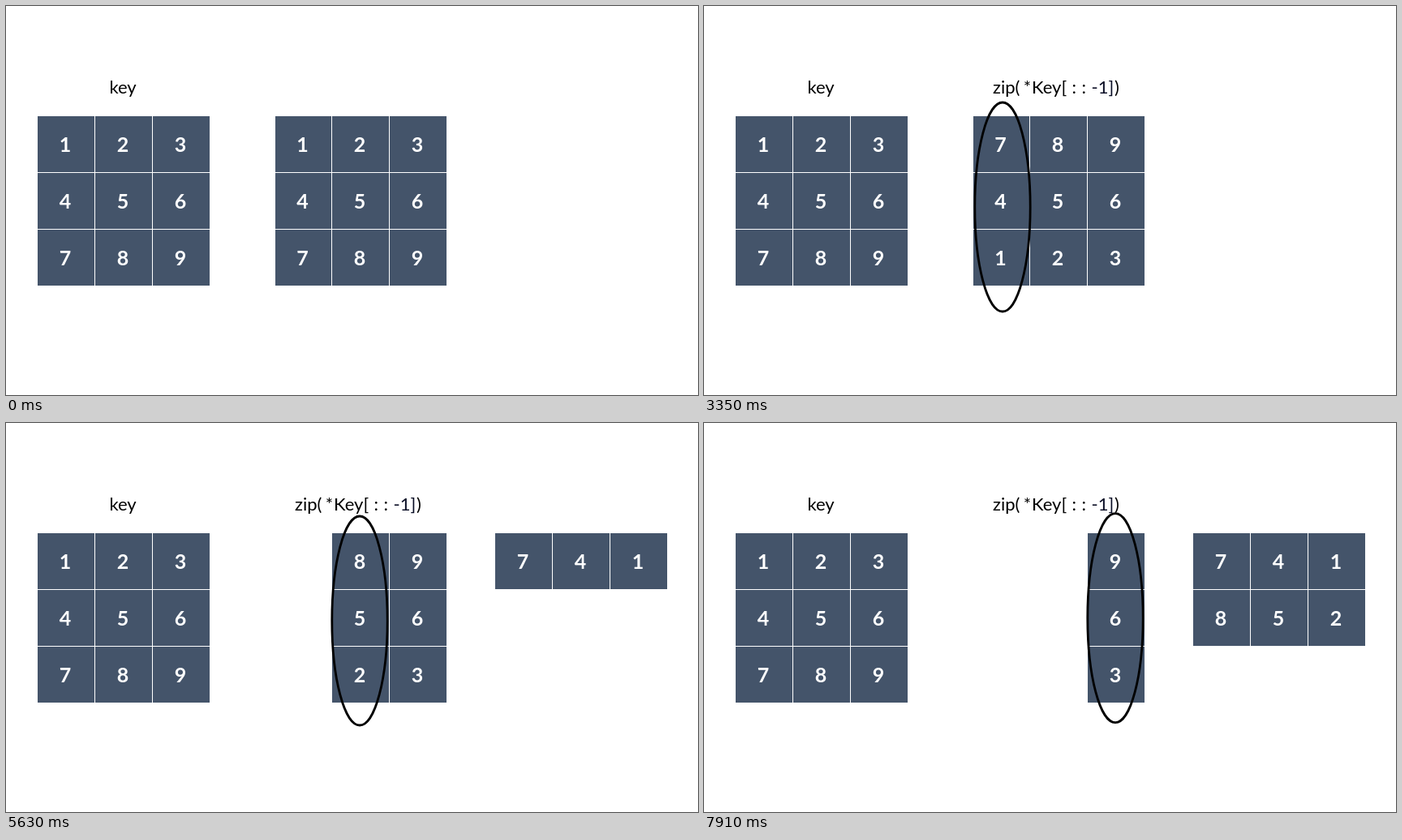
Animation of 853 by 480 pixels, one loop 8000 ms. Source, as an HTML page with a canvas:

```html
<!DOCTYPE html>
<html lang="en">
<head>
<meta charset="utf-8">
<title>Rotating a matrix with zip</title>
<style>
  html, body { margin: 0; width: 100%; height: 100%; overflow: hidden; background: #fff; }
  canvas { display: block; }
</style>
</head>
<body>
<canvas id="stage" width="853" height="480"></canvas>
<script>
const ctx = document.getElementById("stage").getContext("2d");

const LOOP = 8000, FIRST = 1070, STEP = 1140;
const FONT = "Lato, Carlito, sans-serif";
const SLATE = "#44546a", INK = "#000", NAVY = "#080c24";

const KEY = [[1, 2, 3], [4, 5, 6], [7, 8, 9]];
const FLIPPED = [...KEY].reverse();
const ROTATED = KEY[0].map((_, c) => FLIPPED.map(row => row[c]));

// Left edges of the columns in each grid, plus the end
const KEY_X = [39, 110, 181, 252];
const WORK_X = [332, 402, 473, 544];
const OUT_X = [603, 674, 745, 816];
const TOP = 136, ROW = 70;

// Expression pieces: text, left edge, colour
const SLICE = [
  ["Key[", 404, INK],
  [":", 453.5, INK],
  [":", 465.5, INK],
  ["-1]", 477.5, NAVY]
];
const ZIP = [["zip(", 356, INK], ["*", 393.7, INK], ...SLICE, [")", 506, INK]];

function label(text, x, color = INK, align = "left") {
  ctx.font = `22px ${FONT}`;
  ctx.textAlign = align;
  ctx.fillStyle = color;
  ctx.fillText(text, x, 108);
}

function expression(parts, dx = 0) {
  for (const [text, x, color] of parts) label(text, x + dx, color);
}

function grid(values, edges, fromCol = 0) {
  ctx.font = `bold 25px ${FONT}`;
  ctx.textAlign = "center";
  values.forEach((row, r) => {
    const y = TOP + r * ROW;
    for (let c = fromCol; c < row.length; c++) {
      const x = edges[c], w = edges[c + 1] - x - 1;
      ctx.fillStyle = SLATE;
      ctx.fillRect(x, y, w, ROW - 1);
      ctx.fillStyle = "#fff";
      ctx.fillText(row[c], x + w / 2 - 0.9, y + 44);
    }
  });
}

function ring(x, y) {
  ctx.beginPath();
  ctx.ellipse(x, y, 34.2, 129, 0, 0, Math.PI * 2);
  ctx.lineWidth = 2.8;
  ctx.strokeStyle = INK;
  ctx.stroke();
}

function draw(time) {
  const t = time % LOOP;
  const step = t < FIRST ? 0 : 1 + Math.floor((t - FIRST) / STEP);
  const moved = Math.max(0, Math.floor(step / 2) - 1);

  ctx.fillStyle = "#fff";
  ctx.fillRect(0, 0, 853, 480);

  label("key", 144, INK, "center");
  grid(KEY, KEY_X);
  grid(step ? FLIPPED : KEY, WORK_X, moved);
  grid(ROTATED.slice(0, moved), OUT_X);

  if (step === 1) expression(SLICE, -18.5);
  if (step >= 2) expression(ZIP);

  if (step === 3) ring(368, 248);
  if (step === 5) ring(436, 244);
  if (step === 7) ring(507, 240.7);
}

const start = performance.now();
function tick() {
  draw(performance.now() - start);
  requestAnimationFrame(tick);
}
tick();
</script>
</body>
</html>
```
